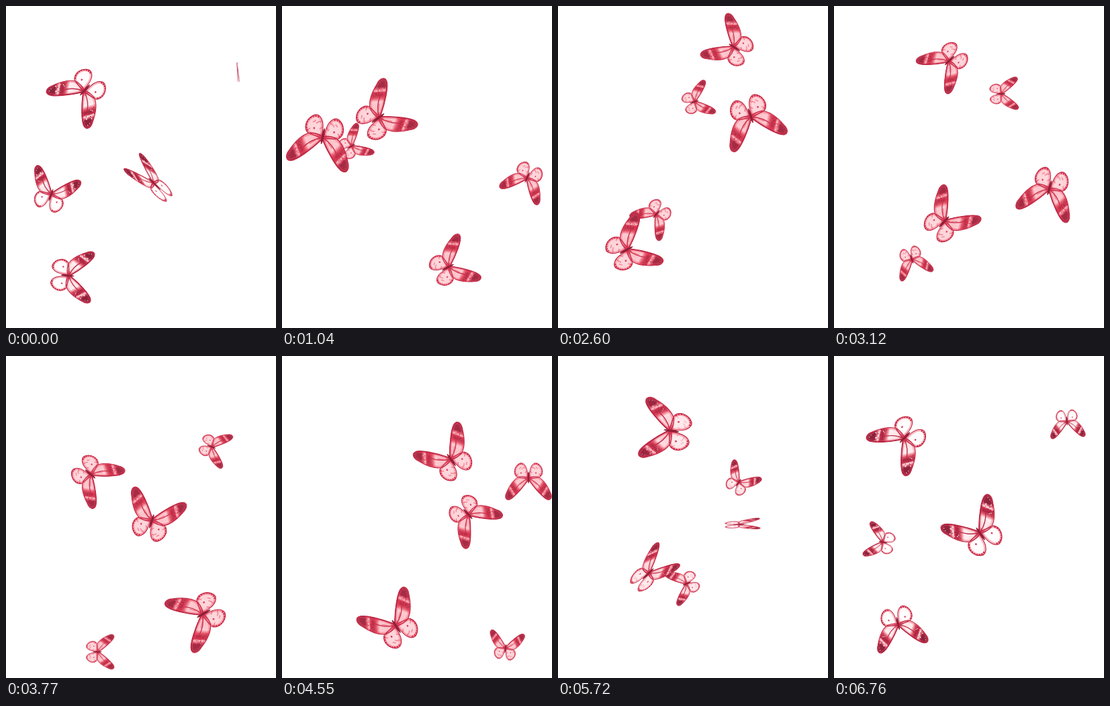
Write an HTML page with a canvas that moves like this. It is 402 px wide and 480 px high and loops after 6.89 s.

```html
<!DOCTYPE html>
<html lang="en">
<head>
<meta charset="utf-8">
<title>Red butterflies</title>
<style>
html, body { margin: 0; width: 100%; height: 100%; overflow: hidden; background: #fff; }
canvas { display: block; }
</style>
</head>
<body>
<canvas id="stage" width="402" height="480"></canvas>
<script>
const ctx = document.getElementById('stage').getContext('2d');
const STEP = 130, STEPS = 53;
const KEY_STEPS = [0, 8, 20, 29, 35, 44, 52];

const pose = (x, y, heading, size = 1, open = .88) => ({ x, y, heading, size, open });
const flight = (scale, ...poses) => ({ scale, poses });

// Usual size of each butterfly, then its poses: x, y, heading in degrees.
const FLIGHTS = [
  flight(.57, pose(68, 279, -70, 1.37), pose(105, 208, -30), pose(205, 142, -19), pose(308, 136, 19),
    pose(367, 184, 90, 1.3), pose(190, 340, 158), pose(71, 277, 193)),
  flight(.56, pose(345, 97, 85, .7, .06), pose(364, 258, 115, 1.25), pose(145, 312, 130, 1.15),
    pose(138, 441, 0), pose(333, 434, -82), pose(270, 187, -55), pose(347, 99, 86)),
  flight(.83, pose(95, 402, 5), pose(250, 388, -27), pose(260, 60, -147), pose(128, 178, -320),
    pose(279, 238, -312), pose(272, 251, -363, .85, .22), pose(96, 402, -283)),
  flight(.96, pose(218, 262, -135, 1.1, .33), pose(146, 165, -36), pose(288, 167, 71), pose(291, 386, 150),
    pose(168, 400, 236), pose(137, 322, 316, 1, .5), pose(216, 262, 235)),
  flight(.92, pose(115, 128, 132), pose(60, 198, 102, 1.1), pose(105, 362, -28), pose(218, 243, -72),
    pose(250, 152, -126), pose(165, 111, -172, 1.06), pose(103, 124, -226))
];

const FORE = new Path2D('M1-2C13-17 35-40 45-41C53-42 55-34 50-26C43-11 33 1 22 5Q8 7 1 3Z');
const HIND = new Path2D('M1 1C9 5 21 0 28 6C36 14 31 26 23 31C14 37 5 29 3 17Z');
const VEINS = new Path2D('M2 1Q20-5 30-20M2 1L23 4');
const EDGE = new Path2D('M1-2C13-17 35-40 45-41');

let seed = 7;
const random = () => (seed = seed * 16807 % 2147483647) / 2147483647;
const between = (a, b) => a + (b - a) * random();
const many = (count, make) => Array.from({ length: count }, (_, i) => make(i));
const tipSpot = () => [between(28, 52), between(-40, -4), between(.4, 1.2)];
const paleSpots = many(13, tipSpot);
const darkSpots = many(13, tipSpot);
const streaks = many(22, () => [between(6, 46), between(-36, 28), between(5, 14)]);
const rimSpots = many(9, i => {
  const a = -.7 + i * .31;
  return [17 + 14 * Math.cos(a), 17 + 14 * Math.sin(a), 1.4];
});

function fade(gradient, ...stops) {
  stops.forEach(([at, color]) => gradient.addColorStop(at, color));
  return gradient;
}

const foreFill = fade(ctx.createLinearGradient(2, 0, 50, -35),
  [0, '#d83a56'], [.12, '#fde0e3'], [.4, '#fff0f1'], [.5, '#e2586c'], [.58, '#a52640'],
  [.66, '#c7314c'], [.71, '#ffe9ea'], [.76, '#e9798a'], [.81, '#8e233c']);
const hindFill = fade(ctx.createRadialGradient(14, 16, 2, 16, 17, 19),
  [.1, '#fff'], [.62, '#fff8f8'], [.83, '#f8b6bf'], [1, '#d32f4e']);

function stroke(path, color, width) {
  ctx.strokeStyle = color;
  ctx.lineWidth = width;
  ctx.stroke(path);
}

function dots(list, color) {
  ctx.fillStyle = color;
  for (const [x, y, r] of list) {
    ctx.beginPath();
    ctx.arc(x, y, r, 0, 7);
    ctx.fill();
  }
}

function panel(path, fill, blur, decorate) {
  ctx.save();
  ctx.clip(path);
  ctx.fillStyle = fill;
  ctx.fill(path);
  stroke(path, 'rgba(235,70,95,.35)', 7);
  decorate();
  // Pink streaks soften the pattern in mid-flight.
  ctx.globalAlpha = blur;
  ctx.fillStyle = '#f64b6238';
  ctx.fill(path);
  const lines = new Path2D();
  for (const [x, y, length] of streaks) {
    lines.moveTo(x, y);
    lines.lineTo(x - length * .7, y + length * .6);
  }
  stroke(lines, '#ec3e5880', 1.8);
  ctx.restore();
  stroke(path, '#c22a47', 1.3);
}

function wing(side, open, blur) {
  ctx.save();
  ctx.scale(side * open, 1);
  panel(HIND, hindFill, blur, () => {
    dots(rimSpots, '#c72644');
    dots([[17, 13, 1.6]], '#d5415a');
  });
  panel(FORE, foreFill, blur, () => {
    ctx.globalAlpha = 1 - .75 * blur;
    dots(paleSpots, '#ffdfe2');
    ctx.globalAlpha = 1;
    dots(darkSpots, '#a51f3b');
    stroke(VEINS, '#bd2c48', 1.6);
    stroke(EDGE, '#a8213d', 3);
  });
  ctx.restore();
}

function butterfly({ x, y, heading, size, open }, scale, blur) {
  ctx.save();
  ctx.translate(x, y);
  ctx.rotate((heading + 90) * Math.PI / 180);
  ctx.scale(size * scale, size * scale);
  wing(-1, open, blur);
  wing(1, open, blur);
  ctx.fillStyle = '#8f2039';
  ctx.beginPath();
  ctx.ellipse(0, 4, 1.8 * Math.min(1, open + .3), 12, 0, 0, 7);
  ctx.fill();
  ctx.restore();
}

const mix = (a, b, u) => a + (b - a) * u;

// Cubic path that leaves and reaches each pose along its heading.
function poseAt(poses, step) {
  let i = 0;
  while (i < poses.length - 2 && step >= KEY_STEPS[i + 1]) i++;
  const gap = KEY_STEPS[i + 1] - KEY_STEPS[i];
  const u = (step - KEY_STEPS[i]) / gap;
  const a = poses[i], b = poses[i + 1];
  const pull = Math.max(Math.hypot(b.x - a.x, b.y - a.y), gap * 12);
  const curve = (key, trig) => {
    const from = pull * trig(a.heading * Math.PI / 180);
    const to = pull * trig(b.heading * Math.PI / 180);
    return mix(a[key], b[key], u * u * (3 - 2 * u)) + from * u * (1 - u) ** 2 - to * u * u * (1 - u);
  };
  const flap = Math.sin(Math.PI * Math.round(gap / 4) * u) ** 2;
  return pose(curve('x', Math.cos), curve('y', Math.sin), mix(a.heading, b.heading, u),
    mix(a.size, b.size, u), mix(a.open, b.open, u) * (1 - .65 * flap));
}

const start = performance.now();

function draw() {
  const step = Math.floor((performance.now() - start) / STEP) % STEPS;
  const blur = Math.min(1, step / 8, (52 - step) / 16);
  ctx.fillStyle = '#fff';
  ctx.fillRect(0, 0, 402, 480);
  for (const { scale, poses } of FLIGHTS) butterfly(poseAt(poses, step), scale, blur);
  requestAnimationFrame(draw);
}
draw();
</script>
</body>
</html>
```
